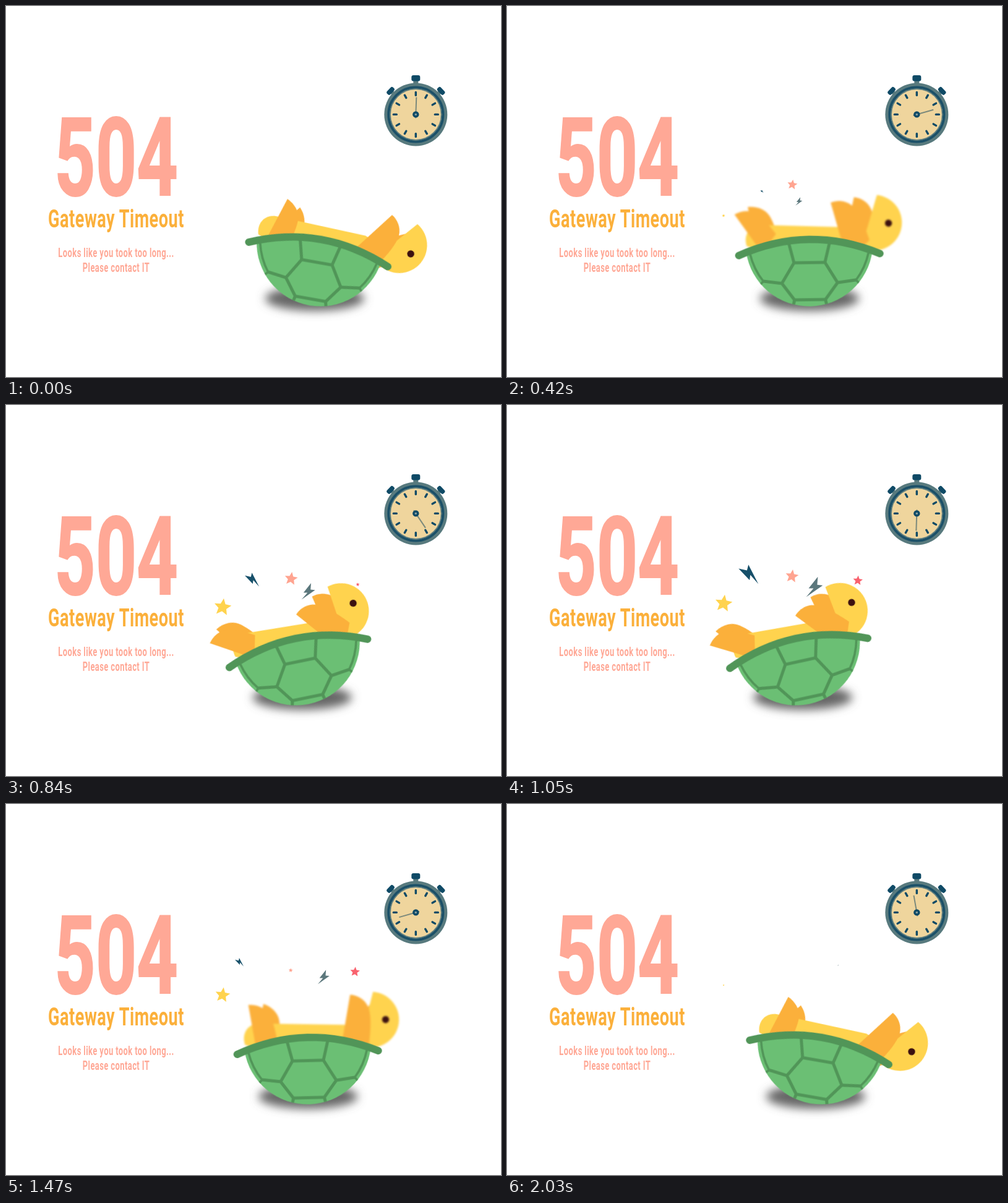
Write an HTML page that moves like this. It is 800x600 px and loops after 2.1 s.

```html
<!DOCTYPE html>
<html lang="en">
<head>
<meta charset="utf-8">
<title>504 Gateway Timeout</title>
<style>
  html, body { margin: 0; width: 100%; height: 100%; overflow: hidden; background: #fff; }
  svg { display: block; width: 800px; height: 600px; }

  .copy text { font-family: Roboto, "Liberation Sans", sans-serif; font-weight: 700; text-anchor: middle; fill: #ffa896; }
  .copy .code { font-size: 176px; stroke: #ffa896; stroke-width: 2px; }
  .copy .title { font-size: 41px; letter-spacing: .8px; fill: #fbb03b; }
  .copy .note { font-size: 19.7px; letter-spacing: .6px; }

  /* every animation is paused here and stepped by the script */
  .anim { animation: 2.1s linear infinite paused; }
  .swing { animation-timing-function: cubic-bezier(.45, 0, .3, 1); }
  .limb { animation-name: flap; animation-timing-function: cubic-bezier(.38, 0, .15, 1); }

  .hand { animation-name: tick; }
  .shadow { animation-name: slide; }
  .turtle { animation-name: roll; }
  .soft { animation-name: soften; }
  .head { animation-name: nod; transform-origin: 86px 24px; }
  .arm { transform-origin: 71px 7px; }
  .leg { transform-origin: -79px 2px; }
  .eye { animation-name: blink; transform-origin: 147px -7.7px; }

  @keyframes tick { from { rotate: 2deg } to { rotate: 362deg } }
  @keyframes slide { 0%, 100% { translate: 499px 473px } 50% { translate: 478px 473px } }
  @keyframes roll {
    0%, 100% { transform: translate(508px, 383px) rotate(10deg) }
    50% { transform: translate(467.5px, 383px) rotate(-12.3deg) }
  }
  @keyframes nod { 0%, 100% { rotate: 0deg } 50% { rotate: -50deg } }
  @keyframes flap { 0%, 100% { rotate: 0deg } 50% { rotate: -79deg } }
  @keyframes blink {
    0%, 23%, 33%, 77%, 87%, 100% { scale: 1 1 }
    28%, 82% { scale: .18 1 }
  }
  @keyframes soften {
    0%, 42%, 50%, 92%, 100% { filter: blur(0px) }
    17%, 67% { filter: blur(2px) }
  }

  .fx { animation-name: drift, var(--pop); }
  @keyframes drift { from { translate: var(--from) } to { translate: var(--to) } }
  @keyframes popYellow { 0%, 18% { scale: 0 } 29%, 58% { scale: 1.45 } 70% { scale: 1.25 } 83% { scale: .75 } 100% { scale: 0 } }
  @keyframes popPink { 0%, 5% { scale: 0 } 13.3% { scale: .5 } 25%, 53% { scale: 1.1 } 70% { scale: .35 } 75%, 100% { scale: 0 } }
  @keyframes popRed { 0%, 34% { scale: 0 } 50%, 70% { scale: .82 } 83.3% { scale: .43 } 94%, 100% { scale: 0 } }
  @keyframes popNavy { 0%, 14% { scale: 0 } 50.5% { scale: 1 } 85%, 100% { scale: 0 } }
  @keyframes popGray { 0%, 2% { scale: 0 } 30% { scale: .64 } 50.5% { scale: 1 } 70% { scale: .7 } 99.5%, 100% { scale: 0 } }
</style>
</head>
<body>
<svg viewBox="0 0 800 600">
  <defs>
    <filter id="haze" x="-30%" y="-120%" width="160%" height="340%"><feGaussianBlur stdDeviation="7.5"/></filter>
    <clipPath id="dome"><path d="M-102,14 A103,103 0 0 0 102,14 Q0,-28 -102,14Z"/></clipPath>
    <path id="star" d="M0,-10 L2.7,-3.7 L9.5,-3.1 L4.4,1.4 L5.9,8.1 L0,4.6 L-5.9,8.1 L-4.4,1.4 L-9.5,-3.1 L-2.7,-3.7Z"/>
    <path id="bolt" d="M6,-17 L-9,2 L-1,2 L-13,16 L14,-3 L5,-4Z"/>
    <path id="arm" d="M106.4,-64.5 C116,-59 124,-47 123,-34 S112,-2 95,22 L46,14Z"/>
    <path id="leg" d="M-64.6,-60.7 C-52,-55 -43,-44 -42,-32 S-46,-2 -50,12 L-88,12Z"/>
    <g id="plates">
      <path d="M0,32 H25 L45,65 L25,92 H0 M25,32 L33,0 M45,65 L75,61 M25,92 L28,106" stroke-width="5"/>
      <path d="M96,16 Q90,42 75,61 L87,75" stroke-width="3.5"/>
    </g>
  </defs>

  <g class="copy" transform="translate(178) scale(.66 1)">
    <text class="code" y="306">504</text>
    <text class="title" y="358">Gateway Timeout</text>
    <text class="note" y="406">Looks like you took too long...</text>
    <text class="note" y="430">Please contact IT</text>
  </g>

  <g transform="translate(662.3 175.4)">
    <rect x="-4" y="-56" width="8" height="8" fill="#587a7e"/>
    <rect x="-7" y="-63.5" width="14" height="9.5" rx="3" fill="#0f4a66"/>
    <g id="knob" transform="rotate(47)">
      <rect x="-3" y="-53" width="6" height="6" fill="#587a7e"/>
      <rect x="-7" y="-59.5" width="14" height="7.5" rx="3" fill="#0f4a66"/>
    </g>
    <use href="#knob" transform="scale(-1 1)"/>
    <circle r="51" fill="#587a7e"/>
    <circle r="44" fill="#efd59d" stroke="#1b5068" stroke-width="4"/>
    <circle r="41.3" fill="none" stroke="#587a7e" stroke-width="1.6"/>
    <g id="ticks" stroke="#0f4a66" stroke-width="3.4" stroke-linecap="round"></g>
    <path class="anim hand" d="M0,6 V-28" stroke="#7c8a7c" stroke-width="2"/>
    <circle r="5.2" fill="#0f4a66"/>
    <circle r="1.7" fill="#8aa0a0"/>
  </g>

  <ellipse class="anim swing shadow" rx="80" ry="20" fill="#666" filter="url(#haze)"/>

  <g class="anim swing turtle">
    <g class="anim soft">
      <g fill="#fbb03b">
        <g class="anim limb leg"><use href="#leg" transform="rotate(22 -79 2)"/></g>
        <g class="anim limb arm"><use href="#arm" transform="rotate(28 71 7)"/></g>
      </g>
      <path d="M-101,4 C-107,-16 -94,-30 -78,-30 L70,-24 Q85,-20 90,12 L0,40Z" fill="#ffd34e"/>
      <g class="anim swing head">
        <path d="M149.4,-56.9 A45,45 0 1 1 90.8,9.4Z" fill="#ffd34e"/>
        <circle class="anim eye" cx="147" cy="-7.7" r="5.7" fill="#3b1010"/>
      </g>
      <g fill="#fbb03b">
        <g class="anim limb leg"><use href="#leg"/></g>
        <g class="anim limb arm"><use href="#arm"/></g>
      </g>
    </g>
    <g clip-path="url(#dome)" fill="none" stroke="#519558" stroke-linejoin="round">
      <circle r="104" fill="#6bbf74" stroke="none"/>
      <use href="#plates"/>
      <use href="#plates" transform="scale(-1 1)"/>
    </g>
    <path d="M-114,19 Q0,-30 114,19" fill="none" stroke="#519558" stroke-width="12" stroke-linecap="round"/>
  </g>

  <g class="anim fx" style="--pop:popYellow; --from:350px 351px; --to:350px 291px"><use href="#star" transform="rotate(8)" fill="#ffd34e"/></g>
  <g class="anim fx" style="--pop:popPink; --from:461.5px 297px; --to:459.5px 257px"><use href="#star" transform="rotate(8)" fill="#ffa490"/></g>
  <g class="anim fx" style="--pop:popRed; --from:574.5px 315.5px; --to:559.5px 252.5px"><use href="#star" transform="rotate(5)" fill="#f9626e"/></g>
  <g class="anim fx" style="--pop:popNavy; --from:426px 317.4px; --to:356.6px 229.3px"><use href="#bolt" transform="rotate(-82) scale(1.08)" fill="#17506a"/></g>
  <g class="anim fx" style="--pop:popGray; --from:455px 330.6px; --to:537.8px 258.6px"><use href="#bolt" fill="#5b777c"/></g>
</svg>
<script>
  const LOOP = 2100, STEP = 70;

  const ticks = document.getElementById("ticks");
  for (let a = 0; a < 360; a += 30) {
    const tick = document.createElementNS("http://www.w3.org/2000/svg", "path");
    tick.setAttribute("d", "M0,-31 V-36");
    tick.setAttribute("transform", `rotate(${a})`);
    ticks.append(tick);
  }

  const motions = document.getAnimations();
  const start = performance.now();

  function draw() {
    const time = Math.floor(((performance.now() - start) % LOOP) / STEP) * STEP;
    for (const m of motions) m.currentTime = time;
    requestAnimationFrame(draw);
  }
  draw();
</script>
</body>
</html>
```
